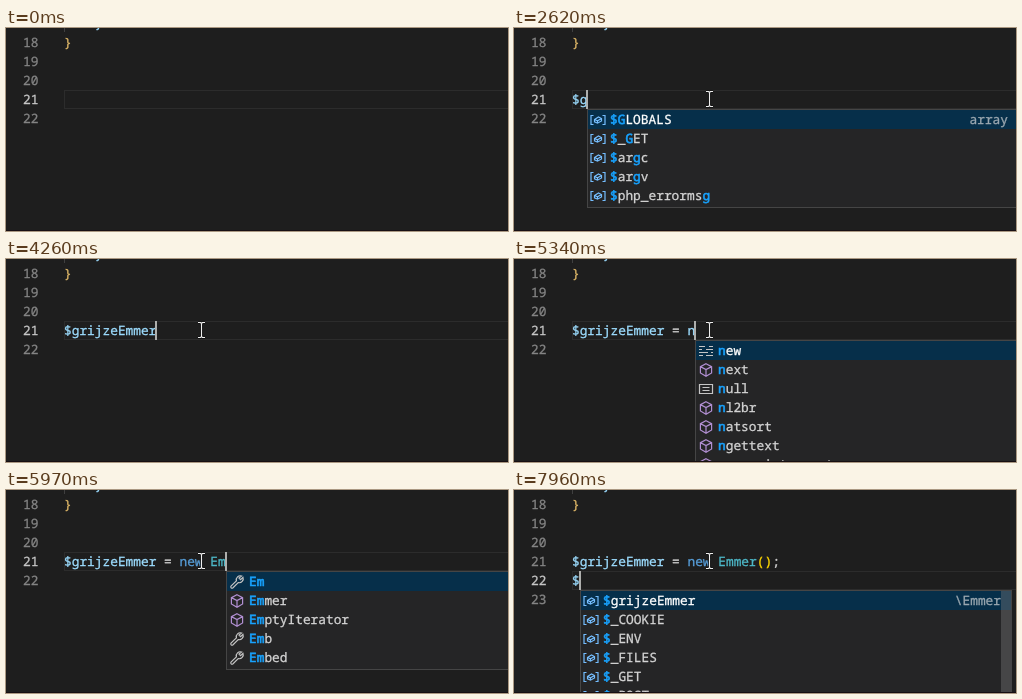
These frames come from a looping animation (502x203 px, 8 s). An HTML page:

```html
<!DOCTYPE html>
<html lang="en">
<head>
<meta charset="utf-8">
<title>Editor typing</title>
<style>
  html, body { margin: 0; width: 100%; height: 100%; overflow: hidden; background: #1e1e1e; }
  svg { display: block; width: 502px; height: 203px; }
  text {
    font: 12.833px "Noto Sans Mono", "DejaVu Sans Mono", monospace;
    text-rendering: geometricPrecision;
    white-space: pre;
  }
  text, tspan { fill: currentColor; stroke: currentColor; stroke-width: .3; }
  .hit { color: #18a3ff; stroke-width: .6; }
  .icon { fill: none; stroke-width: 1.2; }
</style>
</head>
<body>
<svg viewBox="0 0 502 203">
  <defs>
    <g id="variable" class="icon" stroke="#75beff">
      <path d="M-4.5-4.5H-7V4.5H-4.5M4.5-4.5H7V4.5H4.5"/>
      <path d="M-3.5-.5L.5-3L3.5-1.5V1L-.5 3.2L-3.5 1.8ZM-3.5-.5L-.5 .8L3.5-1.5M-.5 .8V3.2"/>
    </g>
    <g id="cube" class="icon" stroke="#b18fd2">
      <path d="M0-6.3L5.6-3.4V3L0 6.3L-5.6 3V-3.4ZM-5.6-3.4L0-.5L5.6-3.4M0-.5V6.3"/>
    </g>
    <g id="keyword" class="icon" stroke="#c5c5c5">
      <path d="M-7-4.5H-1M3-4.5H7M-7-1.5H-4M0-1.5H7M-7 1.5H2M5 1.5H7M-7 4.5H-3M0 4.5H7"/>
    </g>
    <g id="constant" class="icon" stroke="#c5c5c5">
      <path d="M-6.5-4.5H6.5V4.5H-6.5ZM-3.5-1.5H3.5M-3.5 1.5H3.5"/>
    </g>
    <g id="wrench" class="icon" stroke="#c5c5c5">
      <path d="M4.6-6A4 4 0 0 0-.6-1.2L-6 4.2A1.3 1.3 0 0 0-4.2 6L1.2 .6A4 4 0 0 0 6-4.6L3.6-2.4L2-4Z"/>
    </g>
    <path id="beam" d="M-3.5-7.5H-1L0-6.5L1-7.5H3.5M0-6.5V6.5M-3.5 7.5H-1L0 6.5L1 7.5H3.5"/>
  </defs>
  <path d="M58.5 0V4" stroke="#404040"/>
  <text x="88.8" y="0" style="color:#9cdcfe">}</text>
  <text x="58" y="19" style="color:#dcb567">}</text>
  <g id="view"></g>
  <g id="mouse" fill="none">
    <use href="#beam" stroke="#111" stroke-width="2.6"/>
    <use href="#beam" stroke="#eee" stroke-width="1.1"/>
  </g>
  <rect y="202" width="502" height="1" fill="#170f13"/>
</svg>
<script>
const LOOP = 8000, LEFT = 58, CHAR = 7.7, ROW = 19, FIRST = 62;
const view = document.getElementById('view');
const mouse = document.getElementById('mouse');

// Suggestion lists: items are "icon:label", or a bare label with the default icon
const lists = {
  globals: { icon: 'variable', items: '$_COOKIE $_ENV $_FILES $_GET $_POST $_REQUEST $_SERVER' },
  g: { icon: 'variable', items: '$GLOBALS $_GET $argc $argv $php_errormsg', detail: 'array' },
  n: { icon: 'cube', items: 'keyword:new next constant:null nl2br natsort ngettext array_intersect' },
  ne: { icon: 'cube', items: 'keyword:new next ngettext' },
  new: { icon: 'keyword', items: 'new' },
  E: { icon: 'cube', items: 'Emmer Error Exception EmptyIterator ErrorException wrench:Em wrench:Emb' },
  Em: { icon: 'cube', items: 'wrench:Em Emmer EmptyIterator wrench:Emb wrench:Embed' },
  Emmer: { icon: 'cube', items: 'Emmer' },
  vars: { icon: 'variable', items: '$grijzeEmmer $_COOKIE $_ENV $_FILES $_GET $_POST $_SERVER', detail: '\\Emmer', bar: true }
};

// [time, typed text, list, caret hidden, caret column when not at the end]
const name = '$grijzeEmmer', assign = name + ' = ', done = assign + 'new Emmer();';
const steps = [
  [0, '', '', 1], [70, ''], [470, '', '', 1], [930, ''], [1390, '', '', 1], [1850, ''],
  [2230, '$'], [2310, '$', 'globals'], [2540, '$g', 'globals'], [2620, '$g', 'g'],
  [2770, '$gr'], [2850, '$gri'], [3000, '$grij'], [3080, '$grijz'], [3240, '$grijze'],
  [3720, '$grijze', '', 1], [3950, '$grijzeE'], [4030, '$grijzeEmm'], [4180, '$grijzeEmme'],
  [4260, name], [4410, name + ' '], [4560, name + ' ='], [4710, assign],
  [5190, assign, '', 1], [5340, assign + 'n', 'n'], [5420, assign + 'ne', 'ne'],
  [5500, assign + 'new', 'new'], [5650, assign + 'new '], [5810, assign + 'new E', 'E'],
  [5970, assign + 'new Em', 'Em'], [6120, assign + 'new Emm', 'Emmer'],
  [6200, assign + 'new Emme', 'Emmer'], [6270, assign + 'new Emmer', 'Emmer'],
  [6730, assign + 'new Emmer', 'Emmer', 1], [6810, assign + 'new Emmer()', '', 0, 25],
  [7120, assign + 'new Emmer()'], [7200, done], [7580, done + '\n'], [7960, done + '\n$', 'vars']
];

// [time, x, y]
const path = [
  [0, -50, -50], [70, 348, 161], [150, 322, 147], [230, 277, 118], [310, 237, 90],
  [390, 209, 71], [470, 198, 66], [620, 195, 67], [1010, 195, 71]
];

const at = (table, t) => table.filter(row => row[0] <= t).pop();
const span = (s, color) => `<tspan style="color:${color}">${s}</tspan>`;
const text = (x, y, s, color = '#d4d4d4') => `<text x="${x}" y="${y}" style="color:${color}">${s}</text>`;
const rect = (x, y, w, h, look) => `<rect x="${x}" y="${y}" width="${w}" height="${h}" ${look}/>`;

function paint(line) {
  return line.replace(/\$\w*|\bnew\b|\bE\w*|\bn\w*|[()]/g, s => span(s,
    s === 'new' ? '#569cd6' : s[0] === 'E' ? '#4db8c8' : /[()]/.test(s) ? '#ffd700' : '#9cdcfe'));
}

// Marks the typed characters inside a label, in order
function match(label, query) {
  let i = 0;
  return [...label].map(c => {
    const hit = i < query.length && c.toLowerCase() === query[i].toLowerCase();
    if (hit) i++;
    return hit ? `<tspan class="hit">${c}</tspan>` : c;
  }).join('');
}

function popup(list, x, y, query) {
  const items = list.items.split(' ');
  let out = rect(x + .5, y + .5, 431, items.length * ROW + 3, 'fill="#252526" stroke="#454545"');
  out += rect(x + 1, y + 1, 430, ROW, 'fill="#062f4a"');
  items.forEach((item, i) => {
    const [label, icon = list.icon] = item.split(':').reverse();
    const top = y + i * ROW;
    out += `<use href="#${icon}" x="${x + 11}" y="${top + 11}"/>`;
    out += text(x + 23, top + 15, match(label, query), i ? '#d4d4d4' : '#fff');
  });
  if (list.detail) {
    out += text(x + 421 - list.detail.length * CHAR, y + 15, list.detail, '#9aa7b0');
  }
  if (list.bar) out += rect(x + 421, y + 1, 10, 130, 'fill="#797979" fill-opacity=".4"');
  return out;
}

function draw([, code, key, hidden, col]) {
  const lines = code.split('\n');
  const row = lines.length - 1, line = lines[row];
  const top = FIRST + row * ROW;
  const end = Math.round(LEFT + (col || line.length) * CHAR);
  let out = rect(LEFT + .5, top + .5, 460, 18, 'fill="none" stroke="#2c2c2c"');
  for (let n = 18; n <= 22 + row; n++) {
    out += text(17, 76 + (n - 21) * ROW, n, n === 21 + row ? '#c6c6c6' : '#858585');
  }
  if (line.endsWith(')')) {
    [24, 25].forEach(c => out += rect(Math.floor(LEFT + c * CHAR) + .5, top + .5, 7, 18,
      'fill="#006400" fill-opacity=".1" stroke="#888"'));
  }
  lines.forEach((s, i) => out += text(LEFT, 76 + i * ROW, paint(s)));
  if (!hidden) out += rect(Math.max(LEFT, end - 1), top, 2, ROW, 'fill="#aeafad"');
  if (key) out += popup(lists[key], end, top + ROW, line.match(/\$?\w*$/)[0]);
  view.innerHTML = out;
}

let shown;
function tick() {
  const t = performance.now() % LOOP;
  const step = at(steps, t);
  if (step !== shown) draw(shown = step);
  const [, x, y] = at(path, t);
  mouse.setAttribute('transform', `translate(${x + .5} ${y})`);
  requestAnimationFrame(tick);
}
tick();
</script>
</body>
</html>
```
